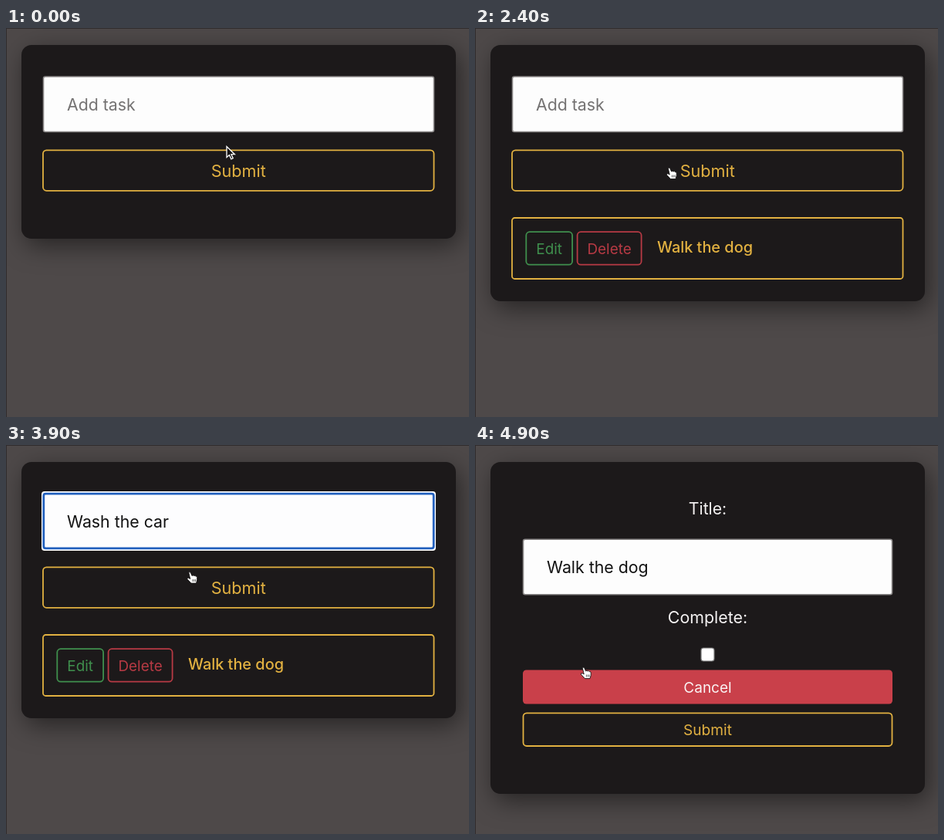
An HTML page that plays this animation: 600x504 px, repeating every 5000 ms.

```html
<!DOCTYPE html>
<html lang="en">
<head>
<meta charset="utf-8">
<style>
html, body { margin: 0; width: 100%; height: 100%; overflow: hidden; background: #4e4949; }
.card {
  position: absolute; left: 20px; top: 22px; width: 563px; border-radius: 13px;
  background: #1c191a; box-shadow: 5px 9px 32px rgba(0, 0, 0, .5);
}
.edge { position: absolute; inset: 0; border: solid #302c2d; border-width: 1px 0 0 1px; }
svg { position: absolute; left: 0; top: 0; font-family: Inter, "Open Sans", sans-serif; }
</style>
</head>
<body>
<div class="card"></div>
<div class="edge"></div>
<svg width="600" height="504" viewBox="0 0 600 504"></svg>
<script>
const card = document.querySelector('.card');
const svg = document.querySelector('svg');
const pen = document.createElement('canvas').getContext('2d');
const GOLD = '#e2b141', GREEN = '#3f8f4d', RED = '#b73a44';
const INPUT_SIZE = 21.3;

// Pointer stops: time, x, y of the hot spot
const stops = [
  [0, 286, 153], [100, 284, 150], [400, 246, 116], [900, 234, 127], [1100, 234, 127],
  [1900, 234, 133], [2000, 239, 150], [2200, 251, 179], [2300, 252, 181], [2400, 252, 181],
  [2700, 236, 119], [2800, 235, 122], [3700, 235, 128], [3800, 236, 146],
  [4000, 241, 183], [4200, 241, 183], [4500, 101, 291], [4700, 101, 294], [4900, 141, 288]
];
// Each task: focus, first key and submit times
const tasks = [
  { name: 'Walk the dog', focus: 500, type: 950, done: 2300 },
  { name: 'Wash the car', focus: 2700, type: 2750, done: 4000 }
];
const KEY = 85, EDIT = 4700, LOOP = 5000;

const rect = (x, y, w, h, r, fill, stroke = 'none', sw = 1.8) =>
  `<rect x="${x}" y="${y}" width="${w}" height="${h}" rx="${r}" fill="${fill}" stroke="${stroke}" stroke-width="${sw}"/>`;
const text = (s, x, y, size, fill, anchor = 'start', weight = 400) =>
  `<text x="${x}" y="${y}" font-size="${size}" fill="${fill}" text-anchor="${anchor}" font-weight="${weight}">${s}</text>`;
const button = (s, x, y, w, h, size, base, color) =>
  rect(x, y, w, h, 4.5, 'none', color) + text(s, x + w / 2, base, size, color, 'middle');

function pointer(t) {
  const i = Math.max(1, stops.findIndex(s => s[0] >= t));
  const [t0, x0, y0] = stops[i - 1], [t1, x1, y1] = stops[i];
  const k = (t - t0) / (t1 - t0), e = k * k * (3 - 2 * k);
  return [x0 + (x1 - x0) * e, y0 + (y1 - y0) * e];
}

function cursor(x, y, kind) {
  const shapes = {
    arrow: `<path d="M0 .5V14.5L3.4 11.5 5.8 16.8 8.2 15.7 5.9 10.7H10.4Z" fill="#141213" stroke="#fff" stroke-width="1.3"/>`,
    beam: ['#fff', '#333'].map((c, i) =>
      `<path d="M-3.5-8Q0-8 0-5.5Q0-8 3.5-8M0-5.5V5.5M-3.5 8Q0 8 0 5.5Q0 8 3.5 8M-2 2H2" fill="none" stroke="${c}" stroke-width="${i ? 1.2 : 2.8}"/>`).join(''),
    hand: `<path d="M-1.6 1.2Q-1-.6.6.6L2.6 5Q4 3.6 5 5Q6.6 4 7.2 5.6Q9 5 9.2 7V10.4L8 14.6H1.4L-3.6 9.2Q-3.8 7.2-1.8 7.8L.2 9Z" fill="#fff" stroke="#161314" stroke-width=".9"/>
      <path d="M3.4 9.5V12.5M5.3 9.5V12.5M7.1 9.5V12.5" stroke="#222" stroke-width=".7"/>`
  };
  return `<g transform="translate(${x} ${y})">${shapes[kind]}</g>`;
}

function field(x, y, w, focused) {
  return focused
    ? rect(x - 2, y - 2.5, w + 4, 77, 4, '#fff') + rect(x + .8, y + .7, w - 1.6, 70.6, 2.5, '#fdfdfe', '#2260be', 2.8)
    : rect(x + .5, y + .5, w - 1, 71.5, 2.5, '#fdfdfd', '#8a8787', 1.6);
}

function listView(t) {
  const now = tasks.find(k => t >= k.focus && t < k.done);
  const typed = now ? now.name.slice(0, Math.max(0, Math.floor((t - now.type) / KEY))) : '';
  let out = field(48, 62.5, 507, now)
    + text(typed || 'Add task', 79, 107, INPUT_SIZE, typed ? '#111' : '#747272');
  const typing = typed && typed.length < now.name.length;
  if (typing || now && !typed && t < now.focus + 400) {
    pen.font = INPUT_SIZE + 'px Inter, "Open Sans", sans-serif';
    out += rect(79 + pen.measureText(typed).width, 87, 1, 24, 0, '#222');
  }
  out += button('Submit', 48, 158.3, 506.5, 52.5, 21.6, 193, GOLD);
  const list = tasks.filter(k => t >= k.done);
  list.forEach((k, i) => {
    const y = i * 80.5;
    out += rect(48, 246 + y, 506.5, 79, 3.5, 'none', GOLD)
      + button('Edit', 66.3, 264.2 + y, 59.8, 42.5, 18.9, 293 + y, GREEN)
      + button('Delete', 132.6, 264.2 + y, 83, 42.5, 18.9, 293 + y, RED)
      + text(k.name, 236, 291 + y, 19.9, GOLD, 'start', 500);
  });
  card.style.height = 251 + list.length * 80.5 + 'px';
  const p = pointer(t), [x, y] = p;
  const kind = y > 62 && y < 135 ? 'beam'
    : y > 158 && y < 211 || y > 264 && x < 126 ? 'hand' : 'arrow';
  return typing ? out : out + cursor(...p, kind);
}

function editView(t) {
  card.style.height = '430px';
  const fill = Math.min(1, .5 + (t - EDIT) / 300);
  return text('Title:', 301.5, 90, 21.2, '#f4f2f2', 'middle')
    + field(62, 121.7, 479, false)
    + text(tasks[0].name, 93, 166, INPUT_SIZE, '#111')
    + text('Complete:', 301.5, 231, 21.4, '#f4f2f2', 'middle')
    + rect(293, 263, 17, 17, 3, '#fff', '#777', 1.2)
    + `<g fill-opacity="${fill}">${rect(62, 291.5, 479, 44, 4.5, '#c9404a')}</g>`
    + text('Cancel', 301.5, 321, 19, '#faf3f3', 'middle')
    + button('Submit', 62.5, 347.3, 478, 42.7, 19.1, 376, GOLD)
    + cursor(...pointer(t), 'hand');
}

function draw(ms) {
  const t = Math.floor(ms % LOOP / 100) * 100;
  svg.innerHTML = t < EDIT ? listView(t) : editView(t);
}

const start = performance.now();
function tick() {
  draw(performance.now() - start);
  requestAnimationFrame(tick);
}
tick();
</script>
</body>
</html>
```
